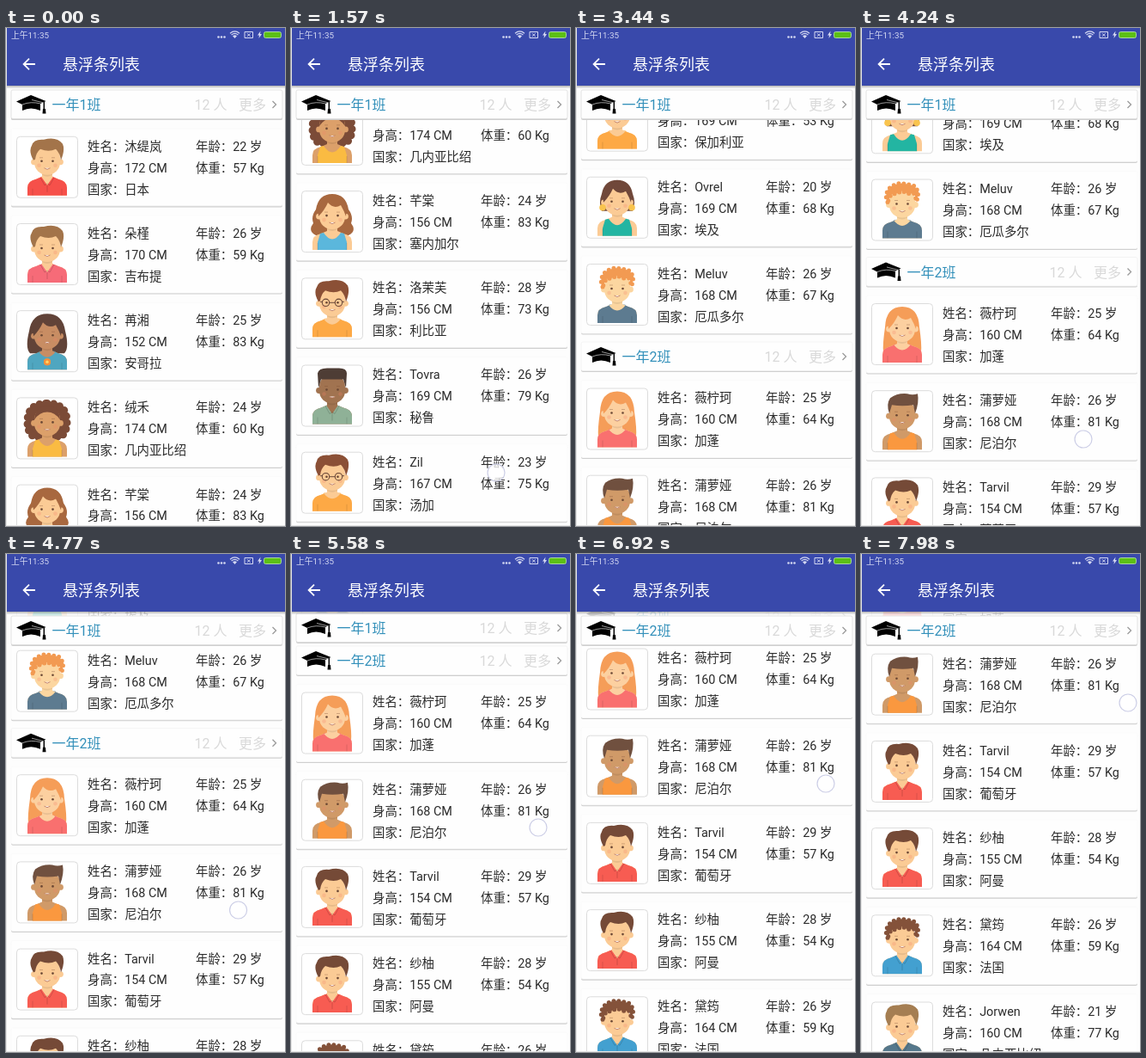
Recreate the animation shown at these times as an HTML page. Size 325 px wide and 579 px high, loop 8 s.

```html
<!DOCTYPE html>
<html lang="zh-CN">
<head>
<meta charset="utf-8">
<title>悬浮条列表</title>
<style>
  html, body { margin: 0; width: 100%; height: 100%; overflow: hidden; background: #fdfdfd; }
  svg { display: block; width: 100%; height: 100%; }
  text { font: 14.4px Roboto, "Noto Sans CJK SC", sans-serif; fill: #2b2b2b; white-space: pre; }
  .class { font-size: 16px; fill: #3390ba; }
  .pale { font-size: 16px; fill: #d9d9d9; }
  .title { font-size: 18px; fill: #fff; }
  .clock { font-size: 9.8px; fill: #d5d9f2; }
  .portrait { filter: blur(.4px); }
</style>
</head>
<body>
<svg viewBox="0 0 325 579">
  <clipPath id="view"><rect y="67" width="325" height="512"/></clipPath>
  <g clip-path="url(#view)">
    <g id="list"></g>
    <g id="pinned"></g>
  </g>
  <rect x="1" y="67" width="324" height="3" fill="#000" opacity=".1"/>
  <rect x="1" y="67" width="324" height="1.2" fill="#000" opacity=".2"/>
  <rect x="1" width="324" height="67" fill="#3949ab"/>
  <text class="clock" x="6" y="12">上午11:35</text>
  <g fill="#d5d9f2">
    <circle cx="247.5" cy="10.5" r="1.3"/><circle cx="251" cy="10.5" r="1.3"/><circle cx="254.5" cy="10.5" r="1.3"/>
    <path d="M264 9.2 Q266.5 7.2 269 9.2 L266.5 12Z M293 8.5 L296.5 3.5 L296 7 H298 L294.5 12 L295 8.5Z"/>
  </g>
  <g fill="none" stroke="#d5d9f2" stroke-width="1.2">
    <path d="M261 6.2 Q266.5 1.6 272 6.2 M262.6 8 Q266.5 4.8 270.4 8"/>
    <path d="M278 4.5 H287.5 V11.5 H278Z M281 6.3 l3.5 3.5 m0 -3.5 l-3.5 3.5" stroke-width="1"/>
    <rect x="300.5" y="4.5" width="20" height="7" rx="2" fill="#5cc015" stroke="#a9d7a0" stroke-width="1"/>
    <path d="M34 42 H21 M27 35.6 L20.6 42 L27 48.4" stroke="#fff" stroke-width="1.8"/>
  </g>
  <text class="title" x="66" y="48.8">悬浮条列表</text>
  <path d="M.5 0 V579 M0 578.5 H325" stroke="#e6e6e6"/>
  <circle id="touch" r="10" fill="#fff" fill-opacity=".75" stroke="#cccee6" stroke-width="1.2"/>
</svg>
<script>
const $ = id => document.getElementById(id);

const PITCH = 101.2, FIRST_ROW = 137.3, PIN_Y = 89, HEADER_HEIGHT = 38;
const SECOND_HEADER = 1347, SECOND_ROW = 1395;

// ---- portraits, drawn in a 72 x 72 box ----
const fill = (d, color, extra = '') => `<path d="${d}" fill="${color}" ${extra}/>`;
const dot = (x, y, r, color) => `<circle cx="${x}" cy="${y}" r="${r}" fill="${color}"/>`;
const pair = (dx, y, r, color) => dot(36 - dx, y, r, color) + dot(36 + dx, y, r, color);

const FRINGE = 'M20 30 Q16 6 36 6 Q56 6 52 30 Q50 24 46 17 Q38 22 31 14 Q27 23 20 30Z';
const hairStyles = {
  quiff: { front: 'M20 28 Q14 17 18 11 Q20 3 32 4 Q47 0 54 9 Q57 16 52 28 Q51 20 46 15 Q38 19 28 15 Q23 19 22 27Z' },
  messy: { front: 'M19 27 L17 20 L19 13 L24 8 L33 5 L42 6 L50 8 L55 15 L53 26 L50 17 L42 17 L36 14 L29 17 L23 18Z', puff: 'stroke-width="5" stroke-dasharray="0 6"' },
  flat: { front: 'M20 27 L19 10 Q20 4 30 4 H44 Q53 4 53 10 L52 27 L49 17 H23Z' },
  tall: { front: 'M21 27 Q17 16 22 9 Q30 3 42 4 Q48 6 54 4 Q56 14 51 27 L49 17 Q36 19 24 17Z' },
  bob: { back: 'M16 50 Q10 44 15 24 Q18 4 36 4 Q54 4 57 24 Q62 44 56 50Z', front: FRINGE },
  wavy: { back: 'M17 52 Q7 47 14 38 Q11 30 17 22 Q20 4 36 4 Q52 4 55 22 Q61 30 58 38 Q65 47 55 52Z', front: FRINGE },
  long: { back: 'M14 57 Q13 48 16 28 Q17 4 36 4 Q55 4 56 28 Q59 48 58 57Z', front: FRINGE },
  tied: { back: 'M18 40 Q14 30 18 20 Q21 4 36 4 Q51 4 54 20 Q58 30 54 40Z', front: FRINGE },
  afro: { back: 'M36 7 Q60 7 59 30 Q58 46 48 46 H24 Q14 46 13 30 Q12 7 36 7Z', front: 'M21 26 Q22 10 36 10 Q50 10 51 26 Q45 17 36 17 Q27 17 21 26Z', puff: 'stroke-width="9" stroke-dasharray="0 7.4"' },
};

const SHOULDERS = 'M13 69 V60 Q13 52 23 50 L30 47 H42 L49 50 Q59 52 59 60 V69Z';
const necklines = {
  polo: shirt => fill(SHOULDERS + 'M29 47 L36 57 L43 47Z', shirt, 'fill-rule="evenodd"') +
    fill('M28 48 L33 57 L36 55 L39 57 L44 48 M36 57 V65', 'none', 'stroke="#000" stroke-opacity=".16"'),
  round: shirt => fill(SHOULDERS + 'M26 48 Q36 61 46 48 L42 47 H30Z', shirt, 'fill-rule="evenodd"'),
  tank: shirt => fill('M19 69 V60 L22 50 L26 49 Q36 64 46 49 L50 50 L53 60 V69Z', shirt),
};

const extras = {
  glasses: fill('M32.5 29 h7 M22 28 h3 M47 28 h3', 'none', 'stroke="#6b4a3a"') +
    [28.5, 43.5].map(x => `<circle cx="${x}" cy="29" r="4.2" fill="none" stroke="#6b4a3a" stroke-width="1.1"/>`).join(''),
  flower: pair(0, 60, 4, '#f6913a') + dot(36, 60, 1.7, '#ffd765'),
  flowers: pair(17, 36, 3.8, '#f9c44e'),
};

function portrait([style, hair, skin, shirt, neckline, extra]) {
  const { back, front, puff } = hairStyles[style];
  const curls = puff ? `stroke="${hair}" stroke-linecap="round" ${puff}` : '';
  return (back ? fill(back, hair, curls) : '') +
    fill(SHOULDERS, skin) + necklines[neckline](shirt) +
    fill('M19 69 V61 M53 69 V61', 'none', 'stroke="#000" stroke-opacity=".12"') +
    fill('M30 38 H42 V48 Q36 54 30 48Z', skin) +
    fill('M30 42 H42 V45 Q36 49 30 45Z', '#000', 'opacity=".08"') +
    pair(15.5, 30, 3.4, skin) +
    `<rect x="21" y="11" width="30" height="34" rx="14.5" fill="${skin}"/>` +
    fill(front, hair, back ? '' : curls) +
    pair(6.5, 29, 1.3, '#6a4734') + pair(9.5, 34, 2.3, '#f2826a44') +
    fill('M31 25 h-4 M41 25 h4', 'none', 'stroke="#7a4a3055"') +
    fill('M32.5 37 Q36 40 39.5 37', '#fff', 'stroke="#b5694c" stroke-width=".8"') +
    (extras[extra] || '');
}

const FAIR = '#fbcb95', BROWN = '#754a37';
const looks = {
  redLight: ['quiff', '#a3744a', FAIR, '#f6504a', 'polo'],
  pinkLight: ['quiff', '#a3744a', FAIR, '#f66b78', 'polo'],
  red: ['quiff', BROWN, FAIR, '#f75c52', 'polo'],
  flower: ['bob', '#614338', '#c88d63', '#4fa6c0', 'round', 'flower'],
  afro: ['afro', '#7b4b37', '#dca06a', '#fabb42', 'tank'],
  wavy: ['wavy', '#a8683f', FAIR, '#5bb7dc', 'tank'],
  glasses: ['quiff', '#8b5036', FAIR, '#fda945', 'round', 'glasses'],
  flat: ['flat', '#4e3d35', '#a17350', '#8fb197', 'polo'],
  tied: ['tied', '#70483a', FAIR, '#23b5a2', 'tank', 'flowers'],
  ginger: ['messy', '#f29a52', '#fcd6a0', '#5d7b90', 'round'],
  long: ['long', '#f59d58', '#fcd0a0', '#f9706f', 'round'],
  tank: ['tall', '#70503f', '#d09a68', '#fa983f', 'tank'],
  blue: ['messy', '#84523a', FAIR, '#43a0d0', 'polo'],
  slate: ['quiff', '#a57e52', FAIR, '#55788c', 'polo'],
};

// name, age, height, weight, country, look
const firstClass = [
  ['沐缇岚', 22, 172, 57, '日本', 'redLight'],
  ['朵槿', 26, 170, 59, '吉布提', 'pinkLight'],
  ['苒湘', 25, 152, 83, '安哥拉', 'flower'],
  ['绒禾', 24, 174, 60, '几内亚比绍', 'afro'],
  ['芊棠', 24, 156, 83, '塞内加尔', 'wavy'],
  ['洛茉芙', 28, 156, 73, '利比亚', 'glasses'],
  ['Tovra', 26, 169, 79, '秘鲁', 'flat'],
  ['Zil', 23, 167, 75, '汤加', 'glasses'],
  ['菲楠朵', 22, 178, 49, '智利', 'red'],
  ['茗岑', 28, 169, 53, '保加利亚', 'glasses'],
  ['Ovrel', 20, 169, 68, '埃及', 'tied'],
  ['Meluv', 26, 168, 67, '厄瓜多尔', 'ginger'],
];
const secondClass = [
  ['薇柠珂', 25, 160, 64, '加蓬', 'long'],
  ['蒲萝娅', 26, 168, 81, '尼泊尔', 'tank'],
  ['Tarvil', 29, 154, 57, '葡萄牙', 'red'],
  ['纱柚', 28, 155, 54, '阿曼', 'red'],
  ['黛筠', 26, 164, 59, '法国', 'blue'],
  ['Jorwen', 21, 160, 77, '几内亚比绍', 'slate'],
];

// ---- list items; y = 0 is the middle of the first text line ----
const label = (x, y, text, cls = '') => `<text x="${x}" y="${y}" class="${cls}">${text}</text>`;
const card = (top, height, edge) =>
  `<rect x="6" y="${top + 1.6}" width="316" height="${height}" rx="2" fill="#cfcfcf"/>` +
  `<rect x="6" y="${top}" width="316" height="${height}" rx="2" fill="#fefefe" stroke="${edge}" stroke-width=".8"/>`;
const place = (y, content) => `<g transform="translate(0 ${y})">${content}</g>`;

const row = ([name, age, height, weight, country, look]) =>
  card(-20.5, 90, '#fafafa') +
  `<rect x="12.5" y="-11" width="71" height="71" rx="4" fill="#fff" stroke="#dcdcdc"/>` +
  `<g class="portrait" transform="translate(12 -11.5)">${portrait(looks[look])}</g>` +
  label(95, 5.4, `姓名：${name}`) + label(221, 5.4, `年龄：${age} 岁`) +
  label(95, 30.4, `身高：${height} CM`) + label(221, 30.4, `体重：${weight} Kg`) +
  label(95, 55.4, `国家：${country}`);

const header = (number, edge = '#f2f2f2') =>
  card(-17, 33.5, edge) +
  fill('M12 -3.5 L29 -11 L46.5 -4 L40 -1 V7 Q29 2 19 7 V0Z', '#000') +
  fill('M19 0 Q29 -4 40 -1 M30 -5.5 L44 -2', 'none', 'stroke="#fff" stroke-width=".6"') +
  fill('M44.3 -3 V6', 'none', 'stroke="#000" stroke-width="1.5"') +
  fill('M43 5 H46 L46.5 10.5 H42.5Z', '#000') +
  label(53.5, 6, `一年${number}班`, 'class') + label(219.5, 6, '12 人', 'pale') + label(271, 6, '更多', 'pale') +
  fill('M310.5 -4 l4 4 l-4 4', 'none', 'stroke="#9a9a9a" stroke-width="1.3"');

const rows = (people, top) => people.map((person, i) => place(top + i * PITCH, row(person))).join('');

$('list').innerHTML = place(PIN_Y, header(1)) + rows(firstClass, FIRST_ROW) +
  place(SECOND_HEADER, header(2)) + rows(secondClass, SECOND_ROW);

// the floating bar has a milky margin that fades the list behind it
const veil = `<rect y="-22" width="325" height="${HEADER_HEIGHT}" fill="#fdfdfd" opacity=".8"/>`;
$('pinned').innerHTML = [1, 2].map(n => `<g>${veil}${header(n, '#dedede')}</g>`).join('');

// ---- motion: [step, value...] points joined by straight lines ----
const scrollPath = [[0, 0], [1, 20], [3, 215], [4, 295], [5, 341.5], [6, 420], [7, 541], [9, 797],
  [10, 880], [11, 935], [12, 965], [13, 978], [14, 1011], [15, 1063.5], [20, 1223], [25, 1274], [29, 1369]];
const swipe = [[5, 239, 517], [6, 262, 439], [7, 288, 318]];
const drag = [[14, 253, 531], [15, 259, 478], [20, 288, 318], [25, 291, 267], [29, 311, 173]];

function along(points, step) {
  const i = Math.max(1, points.findIndex(p => p[0] >= step));
  const [a, b] = [points[i - 1], points[i]];
  const f = (step - a[0]) / (b[0] - a[0]);
  return a.slice(1).map((v, n) => v + (b[n + 1] - v) * f);
}

function draw() {
  const time = performance.now() % 8000;
  // the screen refreshes in hard steps
  const step = Math.min(29, Math.max(0, Math.floor((time - 490) / 267.45) + 1));
  const [scroll] = along(scrollPath, step);
  $('list').setAttribute('transform', `translate(0 ${-scroll})`);

  const nextHeader = SECOND_HEADER - scroll;
  const onSecond = nextHeader <= PIN_Y;
  const pinY = onSecond ? PIN_Y : Math.min(PIN_Y, nextHeader - HEADER_HEIGHT);
  const [first, second] = $('pinned').children;
  first.style.display = onSecond ? 'none' : '';
  second.style.display = onSecond ? '' : 'none';
  $('pinned').setAttribute('transform', `translate(0 ${pinY})`);

  const gesture = [swipe, drag].find(g => step >= g[0][0] && step <= g[g.length - 1][0]);
  $('touch').style.display = gesture ? '' : 'none';
  if (gesture) $('touch').setAttribute('transform', `translate(${along(gesture, step)})`);
  requestAnimationFrame(draw);
}
draw();
</script>
</body>
</html>
```
